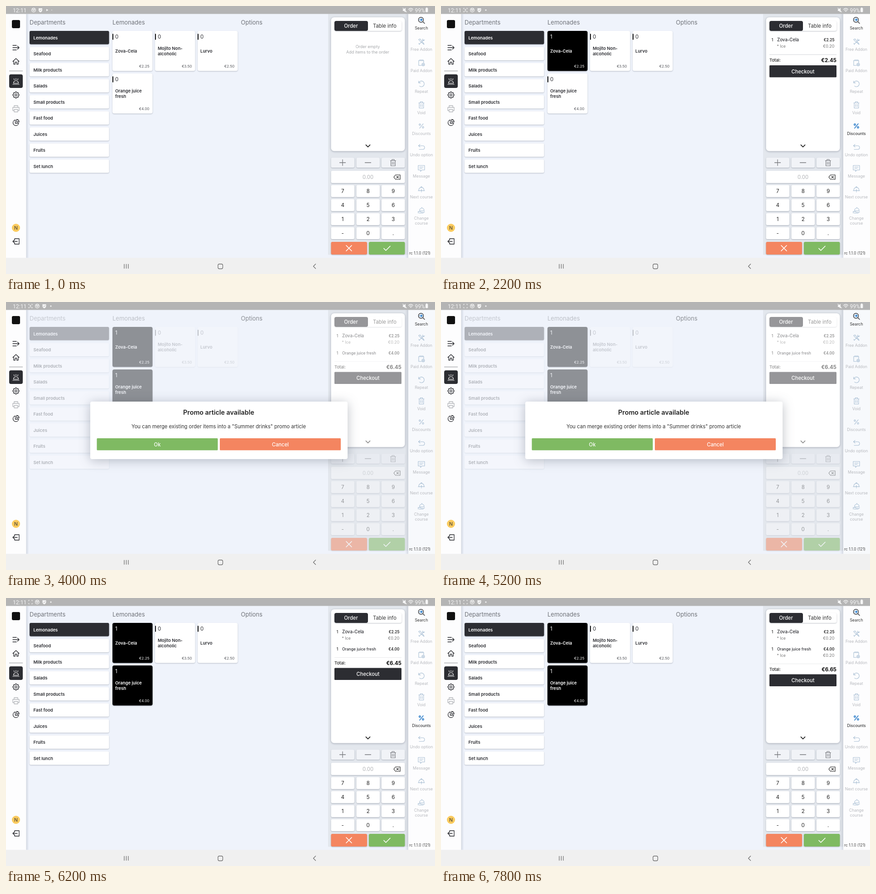
These frames come from a looping animation (947 px wide and 592 px high, 8 s). An HTML page:

```html
<!DOCTYPE html>
<html lang="en">
<head>
<meta charset="utf-8">
<title>Order screen</title>
<style>
html, body { margin: 0; width: 100%; height: 100%; overflow: hidden; background: #eff3fb; }
svg { display: block; width: 947px; height: 592px; }
text { font-family: Inter, "Open Sans", sans-serif; white-space: pre; }
.status text { font-family: Roboto, "Open Sans", sans-serif; }
.card { filter: drop-shadow(0 1px 1.3px rgba(40, 50, 70, .3)); }
.panel { filter: drop-shadow(0 1px 2px rgba(40, 50, 70, .35)); }
.dialog { filter: drop-shadow(0 3px 12px rgba(40, 50, 70, .3)); }
[class*="anim"] { animation-duration: 8s; animation-timing-function: step-end; animation-iteration-count: infinite; }
.anim-total { animation-name: total; }
@keyframes total {
  0%, 20% { transform: translateY(0); }
  25% { transform: translateY(14px); }
  50% { transform: translateY(37.5px); }
  92.5%, 100% { transform: translateY(51.5px); }
}
</style>
</head>
<body>
<svg id="stage" viewBox="0 0 947 592"></svg>
<script>
const LOOP = 8000;
const INK = '#2c2d32', RED = '#f48560', GREEN = '#7fba62', BLUE = '#2379c9';
const COKE = 1600, ICE = 2000, ASK = 4000, DONE = 6200, ICE2 = 7400;
const rules = [];

const group = (body, attrs = '') => `<g ${attrs}>${body}</g>`;

// Hard switch of one property between two times
function during(body, from, to, on = 'visibility:visible', off = 'visibility:hidden') {
  const name = 'anim' + rules.length;
  const pc = ms => ms / LOOP * 100 + '%';
  const tail = to < LOOP ? `${pc(to)},100%{${off}}` : `100%{${on}}`;
  const head = from > 0 ? `0%{${off}}` : '';
  rules.push(`@keyframes ${name}{${head}${pc(from)}{${on}}${tail}}.${name}{animation-name:${name}}`);
  return group(body, `class="${name}"`);
}
const since = (from, body) => during(body, from, LOOP);
const dim = (body, level) => during(body, ASK, DONE, `opacity:${level}`, 'opacity:1');

// y is the middle of the line
const text = (x, y, s, size, fill = '#333', weight = 400, anchor = 'start') =>
  `<text x="${x}" y="${(y + size * .365).toFixed(2)}" font-size="${size}" fill="${fill}" font-weight="${weight}" text-anchor="${anchor}">${s}</text>`;
const mid = (x, y, s, size, fill, weight) => text(x, y, s, size, fill, weight, 'middle');
const right = (x, y, s, size, fill, weight) => text(x, y, s, size, fill, weight, 'end');
const box = (x, y, w, h, fill, r = 0, cls = '') =>
  `<rect x="${x}" y="${y}" width="${w}" height="${h}" rx="${r}" fill="${fill}" class="${cls}"/>`;
const icon = (x, y, d, color = '#25262b', width = 1.3) =>
  `<path transform="translate(${x} ${y})" d="${d}" fill="none" stroke="${color}" stroke-width="${width}" stroke-linecap="round" stroke-linejoin="round"/>`;
const ring = (x, y, r) => `M${x - r} ${y}a${r} ${r} 0 1 0 ${2 * r} 0a${r} ${r} 0 1 0 ${-2 * r} 0`;

const GEAR = (() => {
  let d = '';
  for (let i = 0; i < 32; i++) {
    const a = (i - .5) / 32 * 2 * Math.PI, r = i % 4 < 2 ? 7 : 5.4;
    d += `${i ? 'L' : 'M'}${(r * Math.cos(a)).toFixed(1)} ${(r * Math.sin(a)).toFixed(1)}`;
  }
  return d + 'Z' + ring(0, 0, 2.3);
})();
const TRASH = 'M-6-4.5H6M-2.5-4.5V-7H2.5V-4.5M-4.8-4.5V7H4.8V-4.5M-1.7-1.5V4M1.7-1.5V4';
const CLOCHE = 'M-6 3Q-6-4 0-4Q6-4 6 3M-1.2-5.5H1.2M-7 3H-3M3 3H7';

function statusBar() {
  const W = '#f5f5f5';
  const target = x => icon(x, 9, ring(0, 0, 4.3) + ring(0, 0, 1.6) + 'M-1.5-1.5L-3-3M1.5-1.5L3-3', W, 1.3);
  const shield = x => `<path d="M${x - 4} 5H${x + 4}V10Q${x + 3} 13 ${x} 14Q${x - 3} 13 ${x - 4} 10Z" fill="${W}"/>` +
    icon(x, 9, 'M-1.7 0L-.3 1.4L2-1.4', '#aaa', 1);
  const dot = (x, r) => `<circle cx="${x}" cy="9" r="${r}" fill="${W}"/>`;
  const before = target(61) + shield(76) + `<path d="M89 6.5L93.5 9L89 11.5Z" fill="${W}"/>` + dot(101, .8);
  const after = icon(54, 9, 'M-4-2.5V-4H-2.5M2.5-4H4V-2.5M4 2.5V4H2.5M-2.5 4H-4V2.5', W, 1.1) +
    during(icon(54, 9, ring(0, -1, 1.2) + 'M-2 2.5Q0 .6 2 2.5', W, 1), 200, 4800) +
    target(69) + shield(84.5) + dot(99, 1.6);
  return group(box(0, 0, 947, 17.5, '#b4b4b4') + text(15, 9.2, '12:11', 12.2, W) +
    during(before, 0, 200) + since(200, after) +
    `<path d="M876 7H878.5L882 4V14L878.5 11H876Z" fill="${W}"/>` + icon(880, 9, 'M-4-4.5L4.5 4.5', W, 1.1) +
    icon(893.5, 9, 'M-5-1.5Q0-6 5-1.5M-3.2 .8Q0-2 3.2 .8M-1.2 2.8Q0 1.7 1.2 2.8', W, 1.2) +
    text(902.5, 9.2, '99%', 12, W) + box(926, 4.5, 5.5, 9, W, 1) + box(927.5, 3.3, 2.5, 2, W), 'class="status"');
}

function leftNav() {
  return box(0, 17.5, 44.5, 539, '#fdfdfe') + box(44.5, 17.5, 6, 539, 'url(#fadeL)') +
    box(13, 31, 18, 18, '#111', 3) +
    icon(22, 92, 'M-7-5H1M-7 0H7M-7 5H1M3.5-3.5L7 0L3.5 3.5') +
    icon(22, 122.5, 'M-7 0L0-6.5L7 0M-5-1.5V6H-1.7V1.5H1.7V6H5V-1.5') +
    box(7, 143, 30, 1, '#8d9094') + box(7, 151, 30, 30, INK, 4) +
    icon(22, 167, 'M-7 6H7M-5.5 3.5Q-5-2 0-2Q5-2 5.5 3.5ZM0-4V-7M-3.5-4L-4.5-6.3M3.5-4L4.5-6.3', '#fff', 1.2) +
    icon(22, 196.5, GEAR) +
    icon(22, 227, 'M-4-3V-7H4V-3M-4 4H-7V-3H7V4H4M-4 1.5H4V7H-4Z', '#b4b6ba') +
    icon(22, 257.5, 'M-1.5-5.8A6.3 6.3 0 1 0 6 1.5H-1.5ZM1.5-7A6.2 6.2 0 0 1 7-1.5H1.5Z') +
    '<circle cx="22" cy="490" r="9" fill="#fbcb5f"/>' + mid(22, 490, 'N', 10.5, '#333') +
    icon(22, 520, 'M-3-3V-6H7V6H-3V3M3 0H-7M-4-3L-7 0L-4 3');
}

function departments() {
  const names = ['Lemonades', 'Seafood', 'Milk products', 'Salads', 'Small products', 'Fast food', 'Juices', 'Fruits', 'Set lunch'];
  const list = names.map((name, i) => {
    const y = 55 + i * 35.5;
    return box(52, y, 175.5, 29.5, i ? '#fff' : INK, 3, 'card') + text(60.5, y + 15, name, 9.6, i ? '#2d2e33' : '#fff', 600);
  });
  return dim(text(52, 36.5, 'Departments', 13, '#6f7278') + list.join(''), .33);
}

function tile(x, y, lines, price, picked) {
  const face = (bg, ink, soft, count) => box(x, y, 88.5, 88.5, bg, 4, 'card') +
    text(x + 6, y + 13.2, count, 11.5, ink) +
    lines.map((s, i) => text(x + 6, y + 44.5 + (i - (lines.length - 1) / 2) * 12, s, 9.6, ink, 600)).join('') +
    right(x + 81.5, y + 78, price, 8.2, soft);
  const plain = face('#fff', '#2d2e33', '#55575c', 0) + box(x, y + 6.5, 2, 13, '#111');
  if (!picked) return dim(plain, .22);
  return during(plain, 0, picked) + since(picked, dim(face('#000', '#fff', '#eee', 1), .4));
}

function products() {
  return dim(text(235, 36.5, 'Lemonades', 13, '#6f7278'), .4) +
    dim(text(518.5, 36.5, 'Options', 13, '#6f7278'), .8) +
    tile(235, 55, ['Zova-Cela'], '€2.25', COKE) +
    tile(329, 55, ['Mojito Non-', 'alcoholic'], '€3.50') +
    tile(423, 55, ['Lurvo'], '€2.50') +
    tile(235, 149, ['Orange juice', 'fresh'], '€4.00', ASK);
}

function order() {
  const row = (y, name, price, size) => text(729.5, y, '1', 9.2, '#333', 500) +
    text(742, y, name, size, '#2d2e33', 500) + right(868.5, y, price, 8.3, '#222', 600);
  const extra = y => text(741.5, y, '* Ice', 8.8, '#777') + right(868.5, y, '€0.20', 9, '#777');
  const sum = (s, from, to) => during(right(873, 106, s, 11.5, '#111', 700), from, to);
  const total = group(box(725, 93, 148, 1, '#d4d6da') + text(725, 106, 'Total:', 9.4, '#222', 500) +
    sum('€2.25', COKE, ICE) + sum('€2.45', ICE, ASK) + sum('€6.45', ASK, ICE2) + sum('€6.65', ICE2, LOOP) +
    box(725, 117, 148, 26.5, INK, 1.5) + mid(799, 130.5, 'Checkout', 11.1, '#fff', 500), 'class="anim-total"');
  return box(717.5, 25, 163, 295.5, '#fff', 7, 'panel') +
    box(725, 33, 148.5, 22, '#fff', 4, 'card') + box(725, 33, 74, 22, INK, 4) +
    mid(761.5, 44, 'Order', 11.2, '#fff', 500) + mid(836, 44, 'Table info', 11.2, '#333') +
    during(mid(798.5, 90, 'Order empty', 9, '#a6a8ab') + mid(798.5, 101.5, 'Add items to the order', 9, '#a6a8ab'), 0, COKE) +
    since(COKE, row(74.5, 'Zova-Cela', '€2.25', 9.7) + total) + since(ICE, extra(89)) +
    since(ASK, row(112.5, 'Orange juice fresh', '€4.00', 8.5)) + since(ICE2, extra(127)) +
    icon(799, 309, 'M-4.5-2.2L0 2.3L4.5-2.2', '#222', 1.8) +
    during(box(718, 26, 162, 294, 'rgba(255,255,255,.5)', 7), ASK, DONE);
}

function keypad() {
  const cols = [717.5, 773.5, 829];
  const key = (x, y, h, bg) => box(x, y, 51.5, h, bg, 3, 'card');
  let out = cols.map(x => key(x, 335, 22, '#f1f3f7')).join('') +
    icon(743, 346, 'M-6.5 0H6.5M0-6.5V6.5', '#77797e') + icon(799, 346, 'M-6.5 0H6.5', '#77797e') +
    icon(854.5, 346, TRASH, '#77797e', 1.2) +
    box(717.5, 364, 163, 27, '#fff', 3, 'card') + mid(799, 378, '0.00', 11.3, '#b0b2b6') +
    icon(863, 378, 'M-7 0L-3-5H7V5H-3ZM-.8-2.2L3.6 2.2M3.6-2.2L-.8 2.2', '#222', 1.2);
  [...'789456123-0.'].forEach((s, i) => {
    const x = cols[i % 3], y = 395.5 + Math.floor(i / 3) * 31;
    out += key(x, y, 26.5, '#fff') + mid(x + 25.7, y + 13.5, s, 11.5, '#222');
  });
  return dim(out, .4) + dim(box(717.5, 521, 79.5, 28, RED, 3, 'card') + box(801, 521, 79.5, 28, GREEN, 3, 'card') +
    icon(757, 535, 'M-6-6L6 6M6-6L-6 6', '#fff', 1.7) + icon(841, 535, 'M-7 .5L-2.5 5L7-4.5', '#fff', 1.7), .5);
}

function rightNav() {
  const percent = 'M-4 5L4-5' + ring(-3.5, -3, 1.7) + ring(3.5, 3, 1.7);
  const items = [
    ['Free Addon', 'M-5 6L5-4M-6-5L-3-6L5 4L6 6L4 5L-5-3ZM3-6Q2-3 4-2Q6-2 7-4M-6 4L-4 6'],
    ['Paid Addon', 'M-6-5H5V0M-6-5V6H0M-3-7V-4M0-7V-4M3-7V-4' + ring(4, 4, 3) + 'M4 2.5V5.5M2.5 4H5.5'],
    ['Repeat', 'M-6-6V-2H-2M-6-2A6.3 6.3 0 1 1-4 5'],
    ['Void', TRASH],
    ['Discounts', percent],
    ['Undo option', 'M-3-6L-6.5-3L-3 0M-6.5-3H3Q7-3 7 1Q7 5 3 5H-5'],
    ['Message', 'M-7-6H7V4H1L-2 7V4H-7ZM-4-2.5H4M-4 .5H2'],
    ['Next course', CLOCHE + 'M0 6V1M-2 3L0 1L2 3'],
    ['Change', 'M-4 1Q-4-5 1-5Q6-5 6 1ZM1-5V-7M-7 2V6M-7 3Q-3 2 0 4H3M-5 6H3L7 3']
  ];
  let out = box(881, 17.5, 7, 539, 'url(#fadeR)') + box(888, 17.5, 59, 539, '#fdfdfe') +
    during(box(888, 17.5, 59, 539, '#f7f9fc'), ASK, DONE) +
    icon(917, 32, ring(-1, -1.5, 5.5) + 'M3 2.5L7 6.5', '#30343b', 1.4) +
    icon(916, 30.5, 'M-3 0H3M0-2.5L3 0L0 2.5', BLUE, 1.6) + mid(917, 48.5, 'Search', 8.8, '#333');
  items.forEach(([name, d], i) => {
    const y = 78.7 + i * 46.6;
    out += icon(917, y, d, '#a9bfd4', 1.1) + mid(917, y + 17, name, 8.8, '#b7b9be');
  });
  const active = icon(917, 265, percent, BLUE, 1.4) + mid(917, 282, 'Discounts', 8.8, '#333');
  return out + mid(917, 480, 'course', 8.8, '#b7b9be') +
    during(active, COKE, ASK) + since(DONE, active) + text(890, 545.5, 'rc 1.1.0 (121)', 8.5, '#444');
}

function systemNav() {
  return box(0, 556.5, 947, 36, '#f0f0f0') +
    icon(265.5, 575, 'M-4.5-4.5V4.5M0-4.5V4.5M4.5-4.5V4.5', '#707070', 1.3) +
    '<rect x="468" y="570" width="10.5" height="10.5" rx="3" fill="none" stroke="#707070" stroke-width="1.3"/>' +
    icon(681, 575, 'M2.5-5L-2.5 0L2.5 5', '#707070', 1.3);
}

function promo() {
  return during(box(186, 220, 568, 127, '#fff', 4, 'dialog') +
    mid(469.5, 244, 'Promo article available', 14.3, '#222', 600) +
    mid(469.5, 275, 'You can merge existing order items into a "Summer drinks" promo article', 11.2, '#333') +
    box(200.5, 301, 267, 26.5, GREEN, 1.5) + box(472, 301, 267, 26.5, RED, 1.5) +
    during('<circle cx="617" cy="313.5" r="12" fill="#c9a08c" opacity=".45"/>', 6000, DONE) +
    mid(334, 314.5, 'Ok', 11.2, '#fff', 500) + mid(605.5, 314.5, 'Cancel', 11.2, '#fff', 500), ASK, DONE);
}

const fade = (id, a, b) => `<linearGradient id="${id}"><stop stop-color="#3c465a" stop-opacity="${a}"/><stop offset="1" stop-color="#3c465a" stop-opacity="${b}"/></linearGradient>`;

document.getElementById('stage').innerHTML =
  `<defs>${fade('fadeL', .16, 0)}${fade('fadeR', 0, .14)}</defs>` +
  box(0, 0, 947, 592, '#eff3fb') + box(711, 17.5, 177, 532, '#e3e7ed') +
  departments() + products() + order() + keypad() +
  leftNav() + rightNav() + promo() + systemNav() + statusBar();
const sheet = document.createElement('style');
sheet.textContent = rules.join('\n');
document.head.append(sheet);
</script>
</body>
</html>
```
